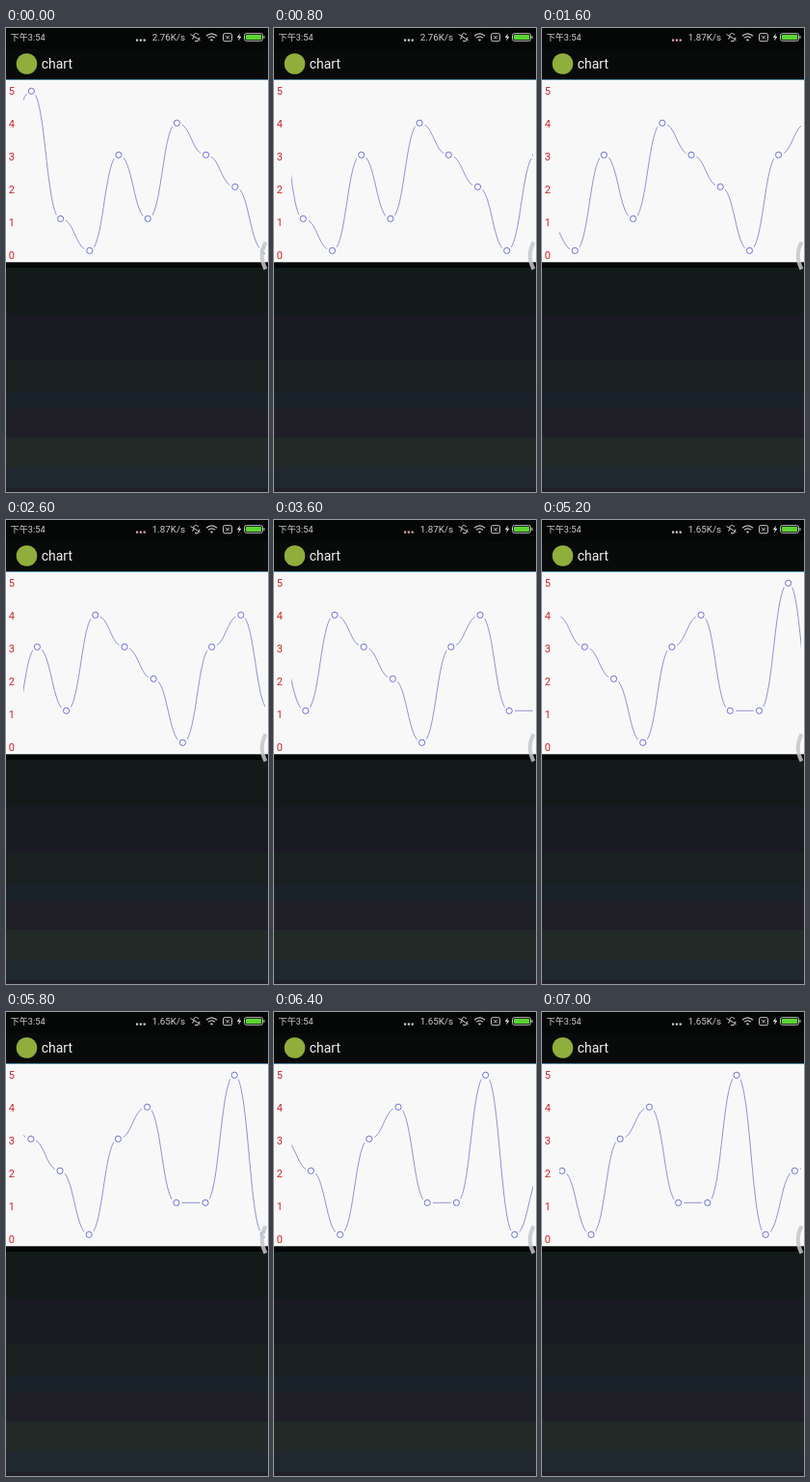
Recreate the animation shown at these times as an HTML page. Size 272 px wide and 480 px high, loop 7.2 s.

```html
<!DOCTYPE html>
<html lang="zh">
<head>
<meta charset="utf-8">
<title>chart</title>
<style>
  html, body { margin: 0; width: 100%; height: 100%; overflow: hidden; background: #050606; }
  svg { display: block; width: 100%; height: 100%; }
  text { font-family: Roboto, "Noto Sans CJK SC", "Noto Sans CJK", sans-serif; }
  .status { fill: #cfcfcf; }
  .icon { fill: none; stroke: #c4c4c4; stroke-width: 1; }
  .label { fill: #c9252c; font-size: 11px; }
  .line { fill: none; stroke: #7777c8; stroke-width: .8; }
  .gap { fill: #f8f8f8; }
  .dot { fill: #fbfbff; stroke: #6060cc; stroke-width: .9; }
</style>
</head>
<body>
<svg viewBox="0 0 272 480">
  <defs>
    <clipPath id="plot"><rect x="18" y="55" width="251" height="187"/></clipPath>
  </defs>
  <rect width="272" height="480" fill="#050606"/>
  <rect y="22" width="272" height="31" fill="#090a0a"/>
  <g id="bands"></g>

  <g class="status">
    <text x="4.5" y="13.3" font-size="9.2">下午3:54</text>
    <g id="more">
      <rect x="135" y="11.5" width="2.2" height="2.2"/>
      <rect x="138.8" y="11.5" width="2.2" height="2.2"/>
      <rect x="142.6" y="11.5" width="2.2" height="2.2"/>
    </g>
    <text id="speed" x="151.7" y="13.2" font-size="9.8"></text>
  </g>
  <g class="icon">
    <path d="M193 11.5L195 10Q194 5.500 197.500 5.500L200 7M201 9.500L199.500 13.500H196M191.500 6.500L201.500 12.500"/>
    <path d="M208 8.300Q213.500 3.500 219 8.300M210 10.300Q213.500 7.400 217 10.300" stroke-width="1.300"/>
    <path d="M211.800 12L213.500 13.800L215.200 12Q213.500 10.800 211.800 12Z" fill="#c4c4c4" stroke="none"/>
    <rect x="225.500" y="5.700" width="9" height="8" rx="1.500"/>
    <path d="M228.200 7.900L231.800 11.500M231.800 7.900L228.200 11.500"/>
    <path d="M242.800 5.500L239.800 10H241.800L241 13.500L244.500 8.800H242.300Z" fill="#d0d0d0" stroke="none"/>
    <rect x="247.500" y="5.700" width="19" height="7.600" rx="2"/>
    <rect x="248.800" y="7" width="16.400" height="5" rx="1" fill="#5bd431" stroke="none"/>
    <path d="M268 8V11"/>
  </g>

  <circle cx="21.500" cy="37" r="10.800" fill="#8fae3c"/>
  <text x="36.700" y="42" font-size="14" fill="#f0f0f0">chart</text>

  <rect y="53" width="272" height="1.300" fill="#4f8fae"/>
  <rect y="54" width="272" height="188.300" fill="#f8f8f8"/>
  <g id="labels"></g>
  <g clip-path="url(#plot)"><g id="series"></g></g>
  <path d="M269.500 221.500Q262 235.500 269.500 249.500" fill="none" stroke="#c6c6cc" stroke-opacity=".85" stroke-width="4"/>
</svg>
<script>
  const LOOP = 7200, TICK = 200, GAP = 30.2;
  const values = [3, 5, 1, 0, 3, 1, 4, 3, 2, 0, 3, 4, 1, 1, 5, 0, 2, 3];
  // time in ms, x of the second value
  const scroll = [[0, 26.4], [1600, -26.2], [2600, -58.2], [3600, -88], [4400, -112.2], [5800, -155.4], [7000, -190.6]];
  const speeds = [[0, '2.76K/s', '#cfcfcf'], [1200, '1.87K/s', '#dca8a8'], [5200, '1.65K/s', '#cfcfcf']];
  const bands = [[248, '#121b1a'], [296, '#1a1a22'], [344, '#18211f'], [376, '#19222b'],
    [394, '#201f28'], [424, '#222a28'], [455, '#1f2830'], [476, '#201f28'], [480]];

  const $ = id => document.getElementById(id);

  function add(parent, tag, attrs, text = '') {
    const el = document.createElementNS('http://www.w3.org/2000/svg', tag);
    for (const key in attrs) el.setAttribute(key, attrs[key]);
    el.textContent = text;
    parent.append(el);
  }

  const px = i => (i - 1) * GAP;
  const py = v => 230.3 - v * 33;

  bands.slice(0, -1).forEach(([y, fill], i) =>
    add($('bands'), 'rect', { y, width: 272, height: bands[i + 1][0] - y, fill }));

  for (let v = 0; v <= 5; v++) add($('labels'), 'text', { class: 'label', x: 2.8, y: 239 - v * 34 }, v);

  const curve = values.map((v, i) => {
    const x = px(i), y = py(v);
    if (!i) return `M${x} ${y}`;
    const mid = x - GAP / 2;
    return `C${mid} ${py(values[i - 1])} ${mid} ${y} ${x} ${y}`;
  }).join('');
  add($('series'), 'path', { class: 'line', d: curve });
  values.forEach((v, i) => {
    const at = { cx: px(i), cy: py(v) };
    add($('series'), 'circle', { ...at, class: 'gap', r: 5.8 });
    add($('series'), 'circle', { ...at, class: 'dot', r: 3.1 });
  });

  function offset(t) {
    const k = Math.max(1, scroll.findIndex(s => s[0] >= t));
    const [t0, x0] = scroll[k - 1], [t1, x1] = scroll[k];
    return x0 + (x1 - x0) * (t - t0) / (t1 - t0);
  }

  const start = performance.now();
  function draw() {
    const t = Math.floor((performance.now() - start) % LOOP / TICK) * TICK;
    const [, rate, tint] = speeds.filter(s => s[0] <= t).pop();
    $('series').setAttribute('transform', `translate(${offset(t).toFixed(2)} 0)`);
    $('speed').textContent = rate;
    $('more').setAttribute('fill', tint);
    requestAnimationFrame(draw);
  }
  draw();
</script>
</body>
</html>
```
